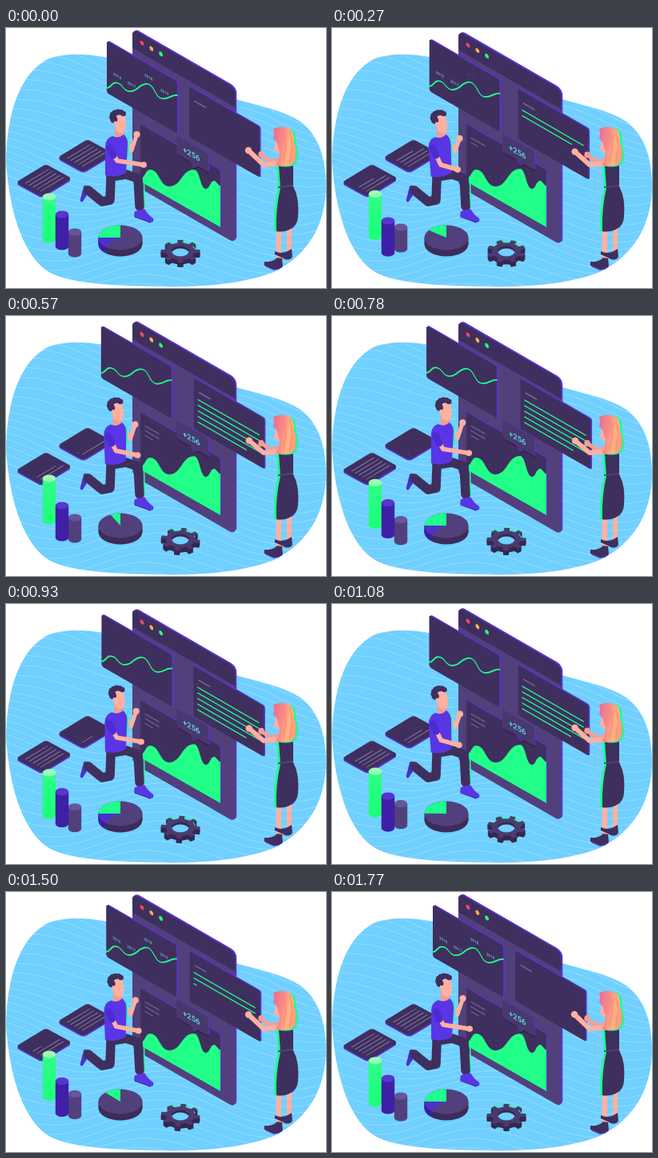
Animation, 400 px wide and 325 px high, one loop 1800 ms. Source, as an HTML page with a canvas:

```html
<!DOCTYPE html>
<html lang="en">
<head>
<meta charset="utf-8">
<title>Dashboard builders</title>
<style>
html, body { margin: 0; width: 100%; height: 100%; overflow: hidden; background: #fff; }
canvas { display: block; }
</style>
</head>
<body>
<canvas id="stage" width="400" height="325"></canvas>
<script>
const c = document.getElementById('stage').getContext('2d');
const LOOP = 1800, SLOPE = 0.577, TAU = 2 * Math.PI;
const SKY = '#70d0ff', DARK = '#3f2f5e', BODY = '#52407c', SIDE = '#35284f', EDGE = '#5a33d8',
      GREEN = '#1fff8c', SKIN = '#ffb0a0', BLUE = '#5935e6', LILAC = '#75639f';

const clamp = v => Math.max(0, Math.min(1, v));
const ramp = (t, from, to) => clamp((t - from) / (to - from));
const smooth = u => u * u * (3 - 2 * u);
const easeOut = u => 1 - (1 - u) ** 2;

// Rises from 0 to 1 at `peak`, then falls back to 0 at `end`
const pulse = (t, peak, end, up = smooth, down = up) =>
  up(ramp(t, 0, peak)) - down(ramp(t, peak, end));

function group(draw) { c.save(); draw(); c.restore(); }

function wall(x, y, draw) {
  group(() => { c.transform(1, SLOPE, 0, 1, x, y); draw(); });
}

function fill(d, color, dx = 0, dy = 0) {
  group(() => {
    c.translate(dx, dy);
    c.fillStyle = color;
    c.fill(new Path2D(d));
  });
}

function oval(x, y, rx, ry, color) {
  c.beginPath();
  c.ellipse(x, y, rx, ry, 0, 0, TAU);
  c.fillStyle = color;
  c.fill();
}

function box(x, y, w, h, r, color) {
  c.beginPath();
  c.roundRect(x, y, w, h, r);
  c.fillStyle = color;
  c.fill();
}

function line(points, color, width) {
  c.beginPath();
  points.forEach(p => c.lineTo(...p));
  c.strokeStyle = color;
  c.lineWidth = width;
  c.lineCap = c.lineJoin = 'round';
  c.stroke();
}

// Adds a wave through its turning points to the current path
function wave(points) {
  points.forEach(([x, y], i) => {
    const [px, py] = points[i - 1] || [x, y], mid = (px + x) / 2;
    i ? c.bezierCurveTo(mid, py, mid, y, x, y) : c.lineTo(x, y);
  });
}

function gradient(x0, y0, x1, y1, ...colors) {
  const g = c.createLinearGradient(x0, y0, x1, y1);
  colors.forEach((color, i) => g.addColorStop(i / (colors.length - 1), color));
  return g;
}

// Rows that are written one after another
function rows(count, shown, draw) {
  for (let i = 0; i < count; i++) {
    const part = clamp(shown - i);
    if (part > 0) draw(i, part);
  }
}

const blob = new Path2D('M0 165C2 95 22 55 52 39C80 28 125 33 165 48C205 64 240 76 288 89' +
  'C315 97 345 102 368 117C392 135 400 165 400 197C400 245 378 283 337 304' +
  'C300 320 240 325 185 323C130 322 85 319 60 308C25 293 4 235 0 165Z');

function background() {
  group(() => {
    c.clip(blob);
    c.fillStyle = SKY;
    c.fillRect(0, 0, 400, 325);
    for (let i = -3; i < 34; i++) {
      c.beginPath();
      for (let x = 0; x <= 400; x += 8)
        c.lineTo(x, i * 10 + x * 0.05 - 15 * Math.sin(x / 42 + i * 0.12) + 6 * Math.sin(x / 80 - i * 0.4));
      c.strokeStyle = 'rgba(255,255,255,.4)';
      c.lineWidth = 0.6;
      c.stroke();
    }
  });
}

function panel(x, y, w, h, draw) {
  wall(x, y, () => {
    box(1.6, -1.6, w, h + 1, 2.5, EDGE);
    box(0, 0, w, h, 2.5, DARK);
    draw();
  });
}

function browser(t, slide) {
  wall(158, 1 + 4.5 * slide, () => {
    box(1.8, -2.2, 128.5, 194, 7, EDGE);
    box(0, 0, 128.5, 194, 7, BODY);
    box(0, 0, 128.5, 24, [7, 7, 0, 0], DARK);
    ['#ff4960', '#ffb14d', '#2dff7c'].forEach((color, i) => oval(12 + i * 11.8, 11, 2.4, 2.7, color));
  });
  wall(168, 120, () => {
    box(0, -1, 101, 73.5, 2, EDGE);
    box(0, 0, 100, 72, 2, DARK);
    rows(3, 3 * ramp(t, 0, 560), (i, part) => {
      const y = 14 + i * 6;
      line([[6, y], [6 + (i < 2 ? 17 : 9) * part, y]], LILAC, 1.3);
    });
  });
  c.beginPath();
  wave([[168, 188], [180, 177], [204, 198], [235, 177 - 2 * slide], [250, 201], [260, 191], [268, 197]]);
  c.lineTo(268, 249);
  c.lineTo(168, 192);
  c.fillStyle = '#22ff88';
  c.fill();
  tag(slide);
}

function tag(slide) {
  wall(213, 134 - 5 * slide, () => {
    const shape = 'M2 0H38Q40 0 40 2V21Q40 23 38 23H26L21 29L17 23H2Q0 23 0 21V2Q0 0 2 0Z';
    fill(shape, '#32244e', 1, 2);
    fill(shape, EDGE, 0.9, -0.4);
    fill(shape, '#493870');
    c.fillStyle = '#58e2dc';
    c.font = '500 9.5px Roboto, sans-serif';
    c.fillText('+256', 8, 16);
  });
}

function timeline(t, slide) {
  const points = [[0, 59], [11, 46], [29, 46.5], [50, 25], [70, 32], [88, 17]];
  panel(126 - 8 * slide, 16 - 4 * slide, 88, 65, () => {
    c.beginPath();
    // Turning points are level on screen, so the wave ignores the wall's slope
    group(() => {
      c.transform(1, -SLOPE, 0, 1, 0, 0);
      wave(points.map(([x, y]) => [x, y + SLOPE * x]));
    });
    c.strokeStyle = GREEN;
    c.lineWidth = 1.5;
    c.stroke();
    c.fillStyle = '#7fe3ea';
    c.font = '4.6px Roboto, sans-serif';
    rows(4, 4 * (1 - ramp(t, 60, 520) + ramp(t, 1110, 1480)), (i, part) => {
      const [x, y] = points[i + 1];
      c.globalAlpha = part;
      c.fillText(2016 + i, x - 3, y - 8);
    });
  });
}

function article(t, slide) {
  panel(229 + 6.5 * slide, 73 + 5 * slide, 88, 63, () => {
    line([[7, 14.5], [20, 14.5]], LILAC, 1.8);
    rows(5, 5 * (ramp(t, 100, 570) - ramp(t, 1150, 1740)), (i, part) => {
      const y = 24 + i * 7;
      line([[5.5, y], [5.5 + (i < 4 ? 76 : 60) * part, y]], GREEN, 1.5);
    });
  });
}

function sheet(x, y, shown) {
  const plane = dy => c.transform(.86, -.52, .84, .46, x, y + dy);
  group(() => { plane(1.8); box(0, 0, 44, 39, 5, EDGE); });
  group(() => {
    plane(0);
    box(0, 0, 44, 39, 5, DARK);
    rows(5, shown, (i, part) => {
      const v = 31 - i * 5.5;
      line([[6, v], [6 + 33 * part, v]], '#9d90b8', 0.9);
    });
  });
}

function cylinder(x, top, height, side, lid) {
  const r = 8.2, ry = 4.6;
  oval(x, top + height, r, ry, side);
  c.fillRect(x - r, top, 2 * r, height);
  oval(x, top, r, ry, lid);
}

function pie(angle) {
  const x = 143, y = 262, rx = 27.5, ry = 15.5, depth = 8;
  const wedge = (from, to, color, dy = 0) => {
    const rad = a => -Math.PI / 2 - a * Math.PI / 180;
    c.beginPath();
    c.moveTo(x, y + dy);
    c.ellipse(x, y + dy, rx, ry, 0, rad(from), rad(to), true);
    c.fillStyle = color;
    c.fill();
  };
  oval(x, y + depth, rx, ry, '#3b2c59');
  c.fillRect(x - rx, y, 2 * rx, depth);
  if (angle > 90) for (let dy = depth; dy > 0; dy--) wedge(90, angle, '#3a20a8', dy);
  oval(x, y, rx, ry, BODY);
  wedge(0, Math.min(angle, 90), GREEN);
  if (angle > 90) wedge(90, angle, '#4c30d0');
}

function gear(turn) {
  const x = 218, y = 279, step = TAU / 8;
  const wheel = (dx, dy, color) => {
    c.beginPath();
    for (let i = 0; i < 8; i++)
      for (const [a, r] of [[-.23, 18.5], [-.18, 24.5], [.18, 24.5], [.23, 18.5]]) {
        const angle = (i + a) * step + turn;
        c.lineTo(x + dx + r * Math.cos(angle), y + dy + r * 0.58 * Math.sin(angle));
      }
    c.fillStyle = color;
    c.fill();
  };
  for (let dy = 6; dy > 0; dy--) wheel(0, dy, SIDE);
  group(() => {
    c.beginPath();
    c.rect(200, 260, 42, 17);
    c.clip();
    wheel(.7, -.9, GREEN);
  });
  wheel(0, 0, '#4b3a72');
  group(() => {
    c.beginPath();
    c.ellipse(x, y, 11, 6.5, 0, 0, TAU);
    c.clip();
    oval(x, y, 12, 7, SIDE);
    oval(x, y + 3, 11, 6.5, SKY);
  });
}

function man(lean) {
  const farHand = [163.5 - 4 * lean, 133 + 5 * lean];
  line([[150 - 4 * lean, 141], [157 - 3 * lean, 153 + lean], farHand], SKIN, 5);
  oval(...farHand, 4, 4, SKIN);

  fill('M93 214L97 198Q100 195 104 199L102 208Q98 213 96 217Q92 218 93 214Z', '#4a2fc8');
  line([[131, 189], [130, 215], [120, 217], [103, 203]], DARK, 11.5);
  line([[172.5, 186], [173, 224]], GREEN, 1.6);
  line([[131, 186], [150, 183], [165, 188], [167, 223]], DARK, 11.5);
  fill('M161 229L173 226Q177 233 184 238Q186 243 180 243L160 235Z', BLUE);
  line([[161, 236], [180, 243]], '#33208f', 1.3);

  group(() => {
    c.translate(145, 188);
    c.rotate(-.085 * lean);
    c.translate(-145, -188);
    const shirt = 'M133 135Q141 139 147 133Q153 137 152 148L150 181Q137 188 124 184L124 149Q124 138 133 135Z';
    fill('M136 124H147L147 138H136Z', '#f59a90');
    line([[152, 138], [153, 150], [151.5, 162]], '#2ff5b4', 2.4);
    fill(shirt, BLUE);
    fill('M135 112Q142 106 149 111L150 124Q149 132 142 131Q135 129 135 112Z', SKIN);
    for (let i = 0; i < 7; i++) {
      const a = 2.55 + i * 0.5;
      oval(141 + 7.5 * Math.cos(a), 111 + 6 * Math.sin(a), 4.6 - i * 0.2, 4.4 - i * 0.2, DARK);
    }
    oval(136.5, 119, 1.8, 2.4, SKIN);
  });

  const shoulder = [130 - 4 * lean, 150], elbow = [139 - 3 * lean, 166 + 5 * lean];
  const hand = [172 - 15 * lean, 171 + 6 * lean];
  line([shoulder, elbow, hand], SKIN, 5.5);
  oval(...hand, 4, 3.8, SKIN);
  line([shoulder, [134 - 4 * lean, 159]], '#4d2bd2', 9);
}

function woman(slide) {
  const near = [303 + slide, 153 + 3 * slide], far = [319, 158 + slide];
  line([[354, 244], [354, 280]], SKIN, 6);
  line([[341, 250], [341, 290]], SKIN, 6.5);
  fill('M336 279Q346 284 357 276L358 286Q355 291 349 289L336 283Z', DARK);
  fill('M323 292Q334 293 339 287L345 288L346 297Q341 305 332 301L323 297Z', DARK);
  line([[325, 298], [335, 302.5], [345, 299]], EDGE, 0.9);

  line([[344, 164], [331, 167], far], '#f79d93', 5);
  oval(...far, 3.7, 4, '#f79d93');

  const dress = 'M341 172Q350 168 359 172L359 198Q367 212 365 236Q364 246 358 250Q348 256 338 254Q337 225 343 200Z';
  fill(dress, GREEN, -3);
  fill(dress, DARK);
  line([[341, 199], [358, 197]], BODY, 2.2);

  line([[343, 169], [322, 171], near], SKIN, 6);
  oval(...near, 4.2, 4.2, SKIN);

  fill('M338 139L335 150Q336 156 344 156L349 140Z', SKIN);
  const hair = 'M334 126Q345 121 355 126Q361 131 360 143Q366 157 360 169Q351 175 337 171' +
    'Q345 160 340 148Q339 142 334 138Q336 132 334 126Z';
  fill(hair, GREEN, 2.5, 1);
  fill(hair, gradient(334, 145, 364, 150, '#f06f91', '#f98a85', '#ffb47a', '#f9938a'));
  for (const x of [347, 355])
    line([[x, 129], [x + 3, 146], [x, 168]], 'rgba(239,91,145,.45)', 1);
}

function draw(t) {
  const half = t % (LOOP / 2);
  const slide = pulse(t, 840, LOOP, easeOut);
  const lean = pulse(half, 270, 870, easeOut, smooth);
  const rise = 8 * pulse(half, 580, 900);
  const cut = pulse(half, 480, 790);

  c.clearRect(0, 0, 400, 325);
  background();
  browser(t, slide);
  timeline(t, slide);
  article(t, slide);
  sheet(64, 162, 5 - 5 * pulse(t, 800, 1500));
  sheet(12, 193, 5 - 4 * cut);
  cylinder(54, 211 - rise, 53, gradient(0, 205, 0, 268, '#2cff86', '#1cff78'), '#9affb4');
  cylinder(86, 255 - 6 * lean, 27, BODY, '#66559a');
  cylinder(70, 233 + 8 * lean, 40, '#3f1fa6', '#5735cf');
  pie(130 * (1 - cut));
  gear(TAU / 16 * lean);
  man(lean);
  woman(slide);
}

function tick() {
  draw(Math.floor(performance.now() / 30) * 30 % LOOP);
  requestAnimationFrame(tick);
}
tick();
</script>
</body>
</html>
```
